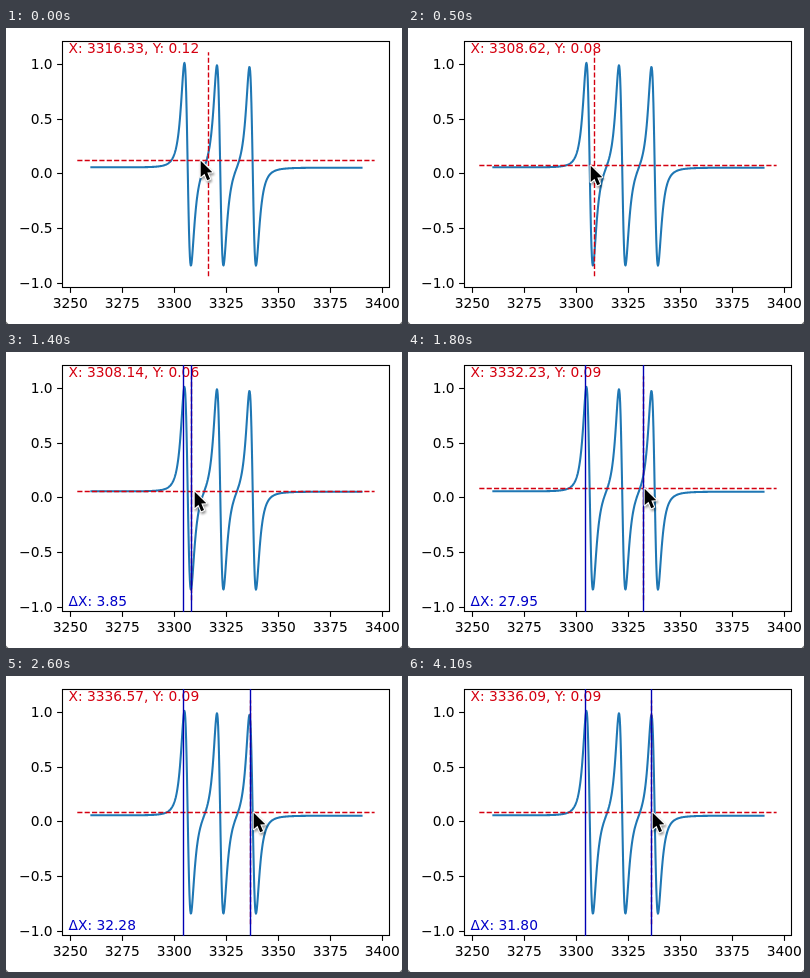
An HTML page that plays this animation: 396 by 296 pixels, repeating every 4.3 s.

```html
<!DOCTYPE html>
<html lang="en">
<head>
<meta charset="utf-8">
<title>Plot cursor</title>
<style>
  html, body { margin: 0; width: 100%; height: 100%; overflow: hidden; background: #fff; }
  svg { display: block; width: 396px; height: 296px; }
  text { font: 13.8px "DejaVu Sans", sans-serif; white-space: pre; }
  .axis { fill: none; stroke: #000; stroke-width: 1.11; }
  .curve { fill: none; stroke: #1f77b4; stroke-width: 2.08; stroke-linecap: square; stroke-linejoin: round; }
  .cross { stroke: #d40010; stroke-width: 1.39; stroke-dasharray: 5.14 2.22; }
  .mark { stroke: #0000b4; stroke-width: 1.39; }
  .pointer { filter: drop-shadow(1px 2px 1.2px rgba(0, 0, 0, .4)); }
  .pointer path { fill: #000; stroke: #fff; stroke-width: 2.2; stroke-linejoin: round; paint-order: stroke; }
</style>
</head>
<body>
<svg viewBox="0 0 396 296">
  <path d="M0 293.5V296H2.5ZM396 293.5V296H393.5Z" fill="#777"/>
  <path class="curve" id="curve"/>
  <g id="ticks"></g>
  <rect class="axis" x="56.5" y="13.5" width="327" height="246"/>
  <text id="pos" x="62.5" y="25" fill="#d40010"></text>
  <path class="cross" id="hair-h" d="M71.3 0H368.6"/>
  <path class="cross" id="hair-v" d="M0 248.3V24.3"/>
  <g id="span">
    <text id="delta" x="62.5" y="254" fill="#0000c8"></text>
    <path class="mark" d="M177.5 13V260"/>
    <path class="mark" id="second" d="M0 13V260"/>
  </g>
  <g class="pointer" id="pointer">
    <path d="M.7 1.2V17.6L4.5 14.2L7.2 20.7L10 19.5L7.3 13.1L12.3 12.7Z"/>
  </g>
</svg>
<script>
const LOOP = 4300, STEP = 100, GRAB = 1280, MARK = 1400;
const ANCHOR = 3304.287, ANCHOR_PX = 177, UNITS_PER_PX = 0.48182;
const Y_ZERO = 145.9, Y_SCALE = 109.3;
const $ = id => document.getElementById(id);
const px = x => 64.6 + (x - 3250) * 2.078;
const py = y => Y_ZERO - y * Y_SCALE;
const pixelCenter = v => Math.floor(v) + 0.5;

// Three equally spaced derivative lines, each a little weaker than the last
function signal(x) {
  let y = 0.0605 - 0.003 * (x - 3260) / 130;
  for (let i = 0; i < 3; i++) {
    const u = (x - 3306.3 - 15.65 * i) / 2.96;
    const q = 1 + u * u;
    y += 0.05 * (1 - u * u) / q ** 2 - (3.1 - 0.03 * i) * u / q ** 2.3;
  }
  return y;
}

function drawCurve() {
  const points = [];
  for (let x = 3260; x <= 3390; x += 0.2) {
    points.push(px(x).toFixed(2) + " " + py(signal(x)).toFixed(2));
  }
  $("curve").setAttribute("d", "M" + points.join("L"));
}

function drawTicks() {
  let out = "";
  for (let x = 3250; x <= 3400; x += 25) {
    const p = pixelCenter(px(x));
    out += `<path class="axis" d="M${p} 260V264.9"/><text x="${p - 0.3}" y="280" text-anchor="middle">${x}</text>`;
  }
  for (let y = -1; y <= 1; y += 0.5) {
    const p = pixelCenter(py(y));
    const label = y.toFixed(1).replace("-", "\u2212");
    out += `<path class="axis" d="M56 ${p}H51.1"/><text x="46.6" y="${p + 4.5}" text-anchor="end">${label}</text>`;
  }
  $("ticks").innerHTML = out;
}

// Progress 0..1 of a move, with two easings
const progress = (t, start, span) => Math.min(1, Math.max(0, (t - start) / span));
const smooth = (t, start, span) => {
  const p = progress(t, start, span);
  return p * p * (3 - 2 * p);
};
const approach = t => 1 - (1 - progress(t, 0, 1200)) ** 2;
const drag = t => smooth(t, GRAB, 510);

// Approach the peak, drag right, drift, overshoot, settle
const hairX = t => ANCHOR_PX + 25 * (1 - approach(t)) + 58 * drag(t) +
  2 * smooth(t, 1900, 400) + 20 * smooth(t, 2500, 250) - 14 * smooth(t, 2750, 250);
const hairY = t => 132 + 7 * approach(t) - 3 * drag(t);

// The pointer runs ahead of the crosshair until the drag begins
const pointerTime = t => t < GRAB ? Math.min(t + 250, GRAB) : t + 10;

function move(id, x, y) {
  $(id).setAttribute("transform", `translate(${x} ${y})`);
}

function render(t) {
  const x = Math.round(hairX(t)), y = Math.round(hairY(t));
  const dx = (x - ANCHOR_PX) * UNITS_PER_PX;
  const value = (Y_ZERO - y - 0.5) / Y_SCALE;
  $("pos").textContent = `X: ${(ANCHOR + dx).toFixed(2)}, Y: ${value.toFixed(2)}`;
  $("delta").textContent = `ΔX: ${dx.toFixed(2)}`;
  $("span").setAttribute("visibility", t >= MARK ? "visible" : "hidden");
  move("second", x + 0.5, 0);
  move("hair-v", x + 0.5, 0);
  move("hair-h", 0, y + 0.5);
  move("pointer", Math.round(hairX(pointerTime(t)) + 1.4), y - 0.5);
}

drawCurve();
drawTicks();
const start = performance.now();
function frame() {
  const t = (performance.now() - start) % LOOP;
  render(Math.floor(t / STEP) * STEP);
  requestAnimationFrame(frame);
}
frame();
</script>
</body>
</html>
```
